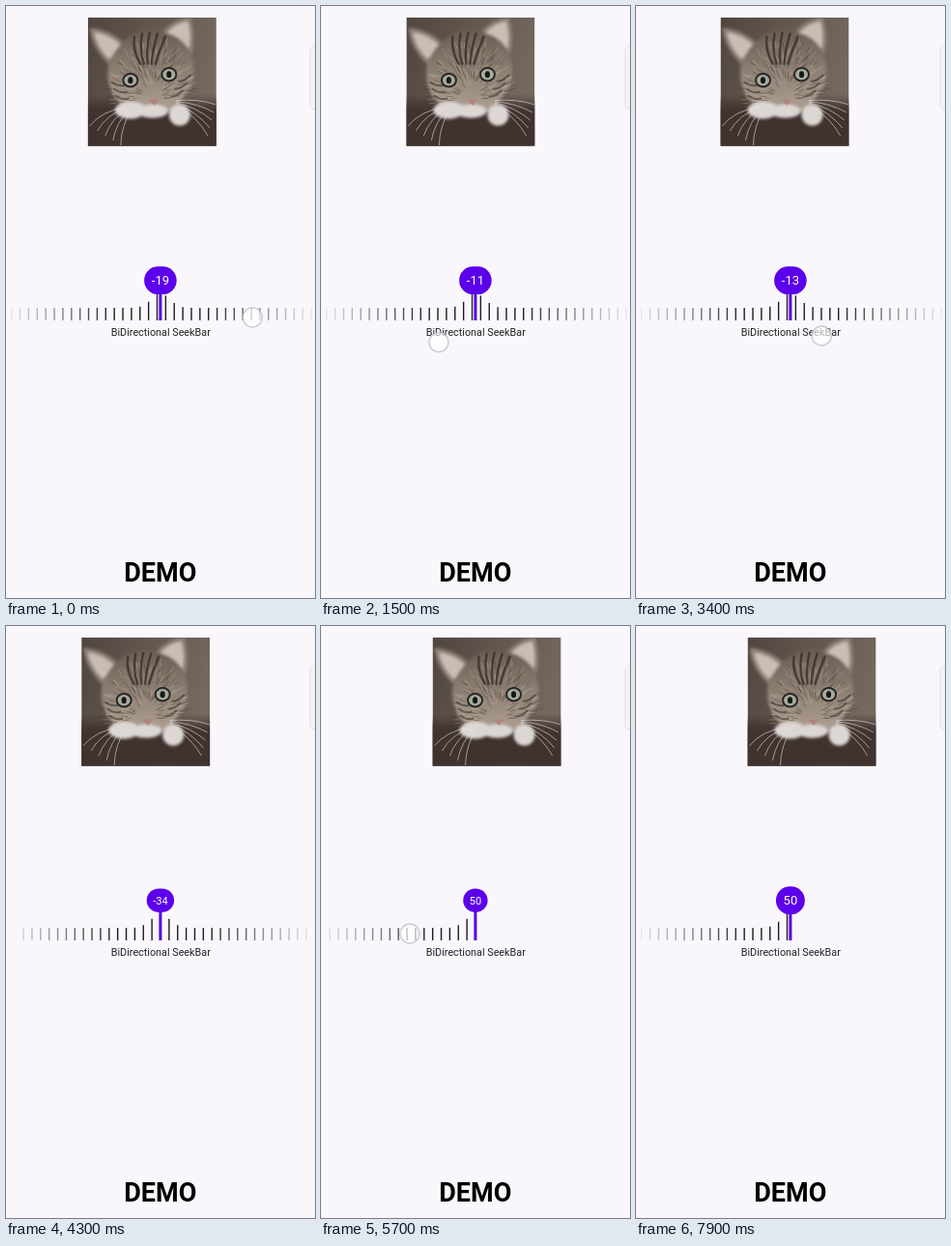
Recreate the animation shown at these times as an HTML page. Size 320 px wide and 612 px high, loop 8000 ms.

```html
<!DOCTYPE html>
<html lang="en">
<head>
<meta charset="utf-8">
<title>Seek bar demo</title>
<style>
  html, body { margin: 0; width: 100%; height: 100%; overflow: hidden; background: #f9f7fb; }
  svg { display: block; width: 320px; height: 612px; }
  text { font-family: Roboto, Arial, sans-serif; text-anchor: middle; }
</style>
</head>
<body>
<svg viewBox="0 0 320 612">
  <defs>
    <linearGradient id="wall" x2="1" y2=".3">
      <stop offset="0" stop-color="#51463f"/>
      <stop offset="1" stop-color="#74685f"/>
    </linearGradient>
    <linearGradient id="fur" x2="0" y2="1">
      <stop offset="0" stop-color="#685c51"/>
      <stop offset="1" stop-color="#b3a597"/>
    </linearGradient>
    <clipPath id="crop"><rect width="133" height="133"/></clipPath>
    <filter id="soft"><feGaussianBlur stdDeviation="1.5"/></filter>
    <filter id="blur"><feGaussianBlur stdDeviation="6"/></filter>
  </defs>

  <rect x="315" y="41" width="20" height="66" rx="5" fill="#f5f3f6" stroke="#e2e0e4"/>

  <g id="photo">
    <g clip-path="url(#crop)">
      <rect width="133" height="133" fill="url(#wall)"/>
      <rect x="-20" y="88" width="173" height="70" fill="#40312d" filter="url(#blur)"/>
      <g filter="url(#soft)">
        <g stroke="#8d8076" stroke-width="4" stroke-linejoin="round" fill="#c9bdb6">
          <path d="M4 13Q24 15 38 30L22 46Q7 32 4 13Z"/>
          <path d="M78 17Q90 3 105 2Q110 20 106 36Z"/>
        </g>
        <path d="M22 46Q36 15 66 13Q98 16 107 38Q116 66 98 84Q84 102 68 102Q42 102 27 82Q17 62 22 46Z" fill="url(#fur)"/>
        <g fill="#dcd7d3">
          <ellipse cx="44" cy="96" rx="16" ry="9"/>
          <ellipse cx="67" cy="97" rx="16" ry="7"/>
          <circle cx="95" cy="101" r="11"/>
        </g>
      </g>
      <g id="hair" fill="none" stroke-linecap="round"></g>
      <g id="eyes"></g>
      <path d="M63 86Q68 83 73 85L69 91Z" fill="#b18480"/>
    </g>
  </g>

  <g id="ticks" stroke="#111" stroke-width="1.4"></g>
  <path d="M159.9 284V325" stroke="#5600e0" stroke-width="3"/>
  <g id="bubble">
    <rect id="pill" y="-12.2" height="24.4" rx="12.2" fill="#5c00eb"/>
    <text id="label" y="4" font-size="11" fill="#fff"></text>
  </g>
  <text x="160.3" y="341" font-size="10.8" fill="#222">BiDirectional SeekBar</text>
  <text x="159.8" y="595" font-size="27" font-weight="700" fill="#000">DEMO</text>
  <circle id="finger" r="10" fill="#fff" fill-opacity=".65" stroke="#bfbdca" stroke-opacity=".8" stroke-width="1.4"/>
</svg>

<script>
const LOOP = 8000, STEP = 100, MID = 160, GAP = 8.87, LIMIT = 50;
const FLING = 300, HOLD = 120, GROW = 160;

// each drag: press and release times, values before and after, finger path
const drags = [
  { down: -200, up: 2050, values: [-19, -1], x: [273, 73], y: [318.5, 357] },
  { down: 2500, up: 3700, values: [-1, -34], x: [64, 235], y: [353, 337] },
  { down: 4600, up: 5100, values: [-34, 50], x: [255, 70], y: [354, 340] },
  { down: 5700, up: 6050, values: [50, -50], x: [92, 265], y: [318, 318] },
  { down: 7200, up: 7500, values: [-50, 50], x: [250, 60], y: [344, 338] }
];

const $ = id => document.getElementById(id);
const clamp = v => Math.min(1, Math.max(0, v));
const mix = ([a, b], p) => a + (b - a) * p;

function set(el, attrs) {
  for (const name in attrs) el.setAttribute(name, attrs[name]);
}

function add(parent, tag, attrs = {}) {
  const el = document.createElementNS("http://www.w3.org/2000/svg", tag);
  set(el, attrs);
  return parent.appendChild(el);
}

let seed = 7;
function random() {
  seed = seed * 16807 % 2147483647;
  return seed / 2147483647;
}

function buildCat() {
  const hair = $("hair");
  const stroke = (d, color, width, opacity) =>
    add(hair, "path", { d, stroke: color, "stroke-width": width, opacity });

  // fur strands fan out from the nose
  for (let i = 0; i < 220; i++) {
    const angle = Math.PI * (0.97 + 1.03 * random()), r = 14 + 46 * random();
    const dx = Math.cos(angle), dy = Math.sin(angle);
    const x = 67 + dx * r * 0.72, y = 84 + dy * r;
    stroke(`M${x} ${y}l${dx * 6} ${dy * 6}`, random() < 0.5 ? "#40372f" : "#c2b3a2", 0.9, 0.4);
  }
  // forehead and cheek stripes
  for (let i = -2; i <= 2; i++) {
    stroke(`M${62 + i * 4} 48Q${60 + i * 7} 34 ${64 + i * 8} ${16 + i * i}`, "#332b26", 2.4, 0.75);
  }
  for (let i = 0; i < 3; i++) {
    stroke(`M${25 + i * 2} ${67 + i * 7}q7 5 13 3`, "#3d342e", 2, 0.6);
    stroke(`M${106 - i * 4} ${60 + i * 8}q-5 6 -12 6`, "#3d342e", 2, 0.6);
  }
  // whiskers
  for (let i = 0; i < 5; i++) {
    stroke(`M${38 + i * 2} 93Q${14 + i * 5} ${97 + i * 4} ${2 + i * 8} ${112 + i * 5}`, "#e4dfdc", 0.8, 0.75);
    stroke(`M92 ${86 + i}Q114 ${84 + i * 5} ${132 - i * 2} ${90 + i * 8}`, "#e4dfdc", 0.8, 0.75);
  }
  for (const [cx, cy] of [[44, 65], [84, 59]]) {
    add($("eyes"), "ellipse", { cx, cy, rx: 7.5, ry: 6.8, fill: "#a3aca0", stroke: "#2c2622", "stroke-width": 2 });
    add($("eyes"), "ellipse", { cx, cy, rx: 2.6, ry: 3.5, fill: "#181716" });
  }
}

const ticks = [];
for (let k = -LIMIT; k <= LIMIT; k++) {
  ticks.push({ k, line: add($("ticks"), "line", { y2: 325 }) });
}

// the value speeds up through the drag and its fling
function valueAt(t) {
  const drag = drags.findLast(d => t >= d.down);
  const p = clamp((t - drag.down) / (drag.up + FLING - drag.down));
  return Math.round(mix(drag.values, p * p));
}

// 1 while the bar is held or flung, 0 at rest
function activeAt(t) {
  return Math.max(...drags.map(d =>
    clamp(Math.min((t - d.down) / GROW, 1 - (t - d.up - FLING - HOLD) / GROW))));
}

function drawTicks(value, active) {
  for (const { k, line } of ticks) {
    const x = MID - 3.5 * active + (k - value) * GAP;
    const d = Math.abs(x - MID);
    const rise = 19 * Math.max(0, 1 - d / 29) ** 2;
    const opacity = d > 157 ? 0 : Math.min(0.95, 0.03 + (MID - d) / 122);
    set(line, { x1: x, x2: x, y1: 312 - rise, opacity });
  }
}

function drawBubble(value, active) {
  $("label").textContent = value;
  const width = Math.max(24.4, $("label").getComputedTextLength() + 13);
  set($("pill"), { x: -width / 2, width });
  set($("bubble"), { transform: `translate(159.9 283.7) scale(${1 + 0.18 * active})` });
}

function drawFinger(t) {
  const drag = drags.find(d => t >= d.down && t <= d.up);
  $("finger").style.display = drag ? "" : "none";
  if (!drag) return;
  const p = (t - drag.down) / (drag.up - drag.down);
  set($("finger"), { cx: mix(drag.x, p), cy: mix(drag.y, p) });
}

function draw(t) {
  const value = valueAt(t), active = activeAt(t);
  set($("photo"), { transform: `translate(${93.3 + 0.445 * value} 11.7)` });
  drawTicks(value, active);
  drawBubble(value, active);
  drawFinger(t);
}

buildCat();
const start = performance.now();
function frame() {
  const t = (performance.now() - start) % LOOP;
  draw(Math.floor(t / STEP) * STEP);
  requestAnimationFrame(frame);
}
frame();
</script>
</body>
</html>
```
